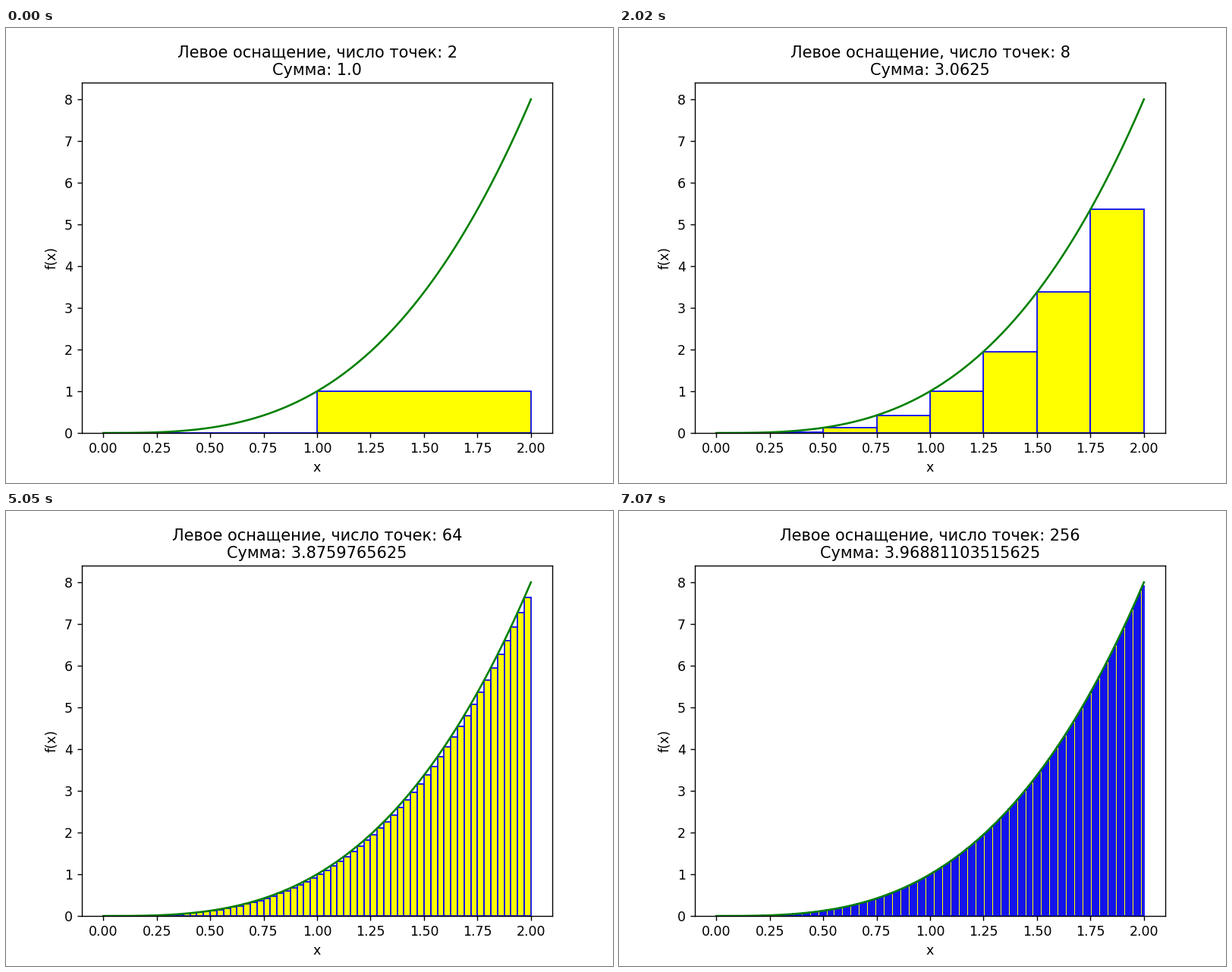
A matplotlib script for the animation above (8000 ms loop, 800 px wide and 600 px high).

```python
import numpy as np
import matplotlib.pyplot as plt
from matplotlib.animation import FuncAnimation

A, B = 0.0, 2.0
STEP_MS = 1010      # time each partition stays on screen
TICK_MS = 50
LOOP_MS = 8000

plt.rcParams["font.family"] = "DejaVu Sans"


def f(x):
    return x ** 3


fig, ax = plt.subplots(figsize=(6.4, 4.8), dpi=125)
curve_x = np.linspace(A, B, 500)
ax.plot(curve_x, f(curve_x), color="green")
ax.set_xlabel("x")
ax.set_ylabel("f(x)")
ax.set_xlim(-0.1, 2.1)
ax.set_ylim(0, 8.4)

state = {"n": None, "bars": None}


def show_sum(n):
    """Draw the left Riemann sum with n rectangles."""
    if state["n"] == n:
        return
    if state["bars"] is not None:
        state["bars"].remove()
    width = (B - A) / n
    left = A + width * np.arange(n)
    state["bars"] = ax.bar(left, f(left), width, align="edge",
                           color="yellow", edgecolor="blue")
    state["n"] = n
    total = float(np.sum(f(left)) * width)
    ax.set_title(f"Левое оснащение, число точек: {n}\nСумма: {total}")


def update(i):
    step = (i * TICK_MS + TICK_MS - 1) // STEP_MS
    show_sum(2 ** (step + 1))
    return []


def init():
    show_sum(2)
    return []


anim = FuncAnimation(fig, update, frames=LOOP_MS // TICK_MS, init_func=init,
                     interval=TICK_MS, repeat=True, repeat_delay=0, blit=False)
plt.show()
```
